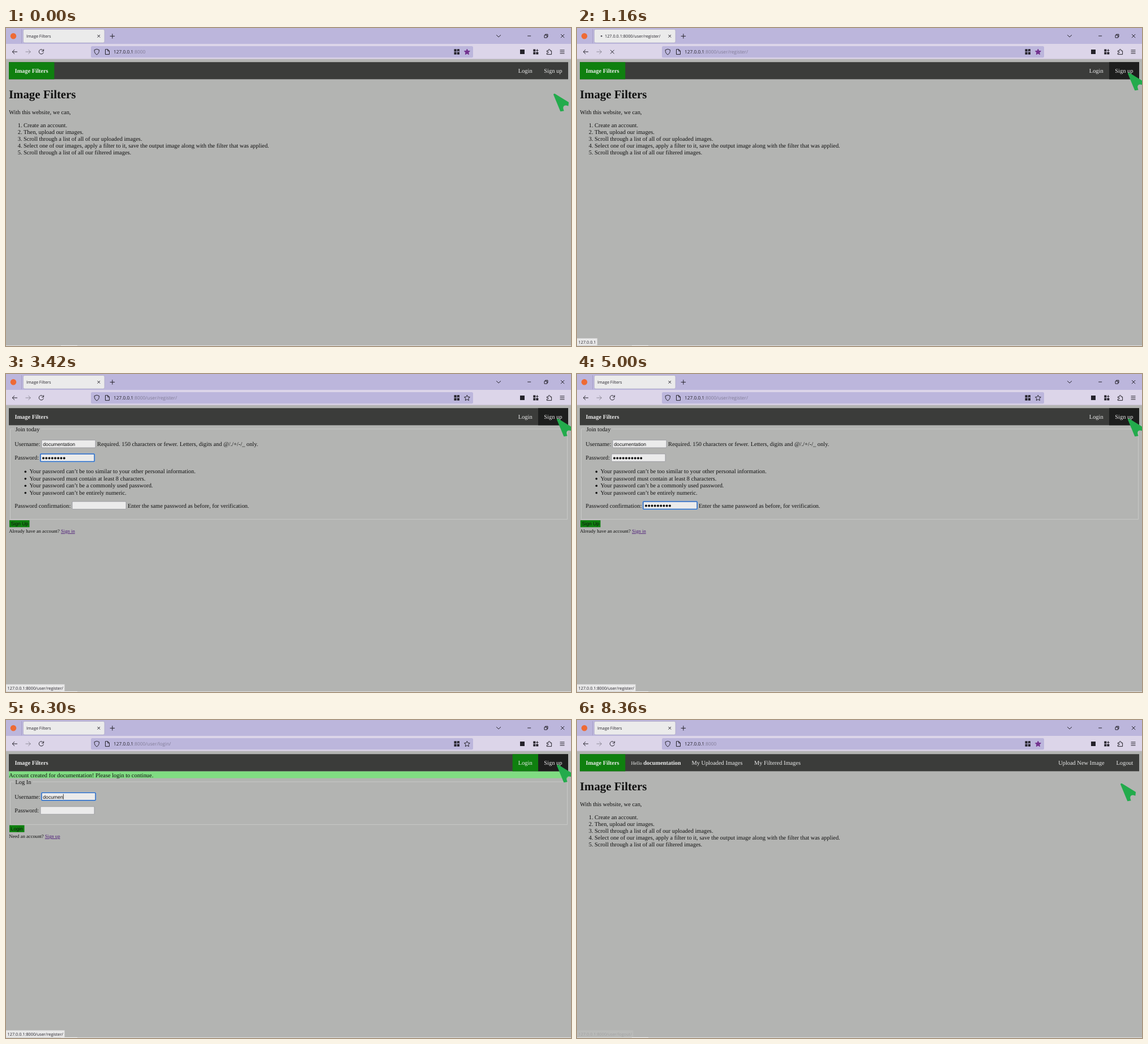
An HTML page for the animation above (8540 ms loop, 998 by 561 pixels).

```html
<!DOCTYPE html>
<html lang="en">
<head>
<meta charset="utf-8">
<title>Image Filters</title>
<style>
html, body { margin: 0; height: 100%; overflow: hidden; background: #b3b4b2; }
svg { display: block; width: 100vw; height: 100vh; }
text { font: 10.4px "Liberation Serif", serif; fill: #101010; white-space: pre; text-rendering: geometricPrecision; }
.ui { font: 7.3px "Open Sans", sans-serif; fill: #25232b; }
.url { font-size: 8.3px; }
.small { font-size: 8.67px; }
.sans { font: 8.67px "Liberation Sans", sans-serif; }
.bold { font-weight: bold; }
.h1 { font-size: 20.8px; font-weight: bold; }
.nav { fill: #ececec; }
.link { fill: #4c1a78; text-decoration: underline; }
.icon { fill: none; stroke: #25232b; stroke-width: 1; stroke-linejoin: round; }
.solid { fill: #25232b; stroke: none; }
.green { fill: #0f800f; }
.groove { fill: none; stroke: #c8c9c7; stroke-width: 1; }
.box { fill: #ebebeb; stroke: #8b8b93; stroke-width: .7; }
.focus { fill: none; stroke: #1762c9; stroke-width: 1.4; }
.halo { fill: none; stroke: #8fb0dc; stroke-width: .7; }
.dots { stroke: #101010; stroke-width: 4; stroke-linecap: round; stroke-dasharray: 0 5.25; }
.caret { stroke: #101010; stroke-width: .8; }
</style>
</head>
<body>
<svg id="stage" viewBox="0 0 998 561" preserveAspectRatio="none"></svg>
<script>
const USER = "documentation";
const HOST = "127.0.0.1";
const LOOP = 8540;

const text = (x, y, content, cls = "", id = "") =>
  `<text x="${x}" y="${y}" class="${cls}" id="${id}">${content}</text>`;
const rect = (x, y, w, h, attrs = "") =>
  `<rect x="${x}" y="${y}" width="${w}" height="${h}" ${attrs}/>`;
const icon = (d, attrs = "") => `<path class="icon" d="${d}" ${attrs}/>`;
const group = (id, ...parts) => `<g id="${id}">${parts.join("")}</g>`;

// Runs are [first key, interval, number of keys]; all times in ms.
const fields = [
  { id: "newName", x: 63, y: 116.6, from: 1240, to: 2760, runs: [[1540, 110, 5], [2040, 75, 5], [2480, 80, 3]] },
  { id: "newPass", x: 61, y: 141, from: 2760, to: 3800, secret: true, runs: [[2900, 66, 7], [3340, 160, 3]] },
  { id: "confirm", x: 117, y: 225, from: 3800, to: 5600, secret: true, runs: [[4040, 114, 8], [4960, 160, 2]] },
  { id: "name", x: 63, y: 128.4, from: 5600, to: 6900, runs: [[5820, 80, 11], [6740, 70, 2]] },
  { id: "pass", x: 61, y: 152.8, from: 6900, to: 7920, secret: true, runs: [[7000, 64, 6], [7460, 60, 4]] },
];

const loads = [
  { start: 1040, commit: 1120, paint: 1240, end: 1320, path: "/user/register/" },
  { start: 5260, commit: 5400, paint: 5600, end: 5700, path: "/user/login/" },
  { start: 7760, commit: 7820, paint: 7920, end: 7940, path: "" },
];

function fieldMarkup({ id, x, y, secret }) {
  const content = secret
    ? `<line class="dots" id="${id}Value" x1="${x + 5}" x2="${x + 5}" y1="${y + 7.5}" y2="${y + 7.5}"/>`
    : text(x + 2.3, y + 10.2, "", "sans", id + "Value") +
      `<line class="caret" id="${id}Caret" y1="${y + 2.2}" y2="${y + 11.6}"/>`;
  return rect(x, y, 95, 13.4, 'class="box" rx="1"') +
    group(id + "Focus",
      rect(x - .2, y, 95.4, 13.4, 'class="focus" rx="1"'),
      rect(x - 1.2, y - 1, 97.4, 15.4, 'class="halo" rx="2"')) + content;
}
const field = id => fieldMarkup(fields.find(f => f.id === id));
const fieldset = (top, bottom, gapEnd) =>
  `<path class="groove" d="M14 ${top}H7.5V${bottom}H991.5V${top}H${gapEnd}"/>`;

const tabBar = [
  rect(0, 0, 998, 28, 'fill="#bcb6dc"'),
  '<circle cx="13" cy="14.3" r="5.2" fill="#ee6a35"/>',
  rect(27, 2, .8, 25, 'fill="#a39dc4"'),
  rect(30.5, 2.5, 143.5, 23.5, 'rx="2.5" fill="#ebebeb" stroke="#a9a4c0" stroke-width=".6"'),
  '<circle id="throbber" cy="14.3" r="1.3" fill="#44424c"/>',
  text(36, 17.4, "", "ui", "tabTitle"),
  icon("M161.5 12l4.6 4.6m0-4.6l-4.6 4.6", 'stroke-width=".8"'),
  icon("M183.7 14.4h8.4m-4.2-4.2v8.4"),
  icon("M866.2 12.3l3.9 3.6 3.9-3.6"),
  icon("M921.2 14h6"),
  icon("M951 12.7h4.6v4.4h-4.6zM952.4 12.5v-1.4h4.6v4.5h-1.3", 'stroke-width=".8"'),
  icon("M980 11l6.2 6.2m0-6.2l-6.2 6.2", 'stroke-width=".9"'),
];

const star = "M814.4 37.2l1.5 3.2 3.5.4-2.6 2.4.7 3.5-3.1-1.8-3.1 1.8.7-3.5-2.6-2.4 3.5-.4z";
const toolbar = [
  rect(0, 28, 998, 27, 'fill="#dcd5e9"'),
  rect(0, 54.4, 998, .7, 'fill="#c3bccb"'),
  icon("M20 42H11.2m3.9-3.8L11.2 42l3.9 3.8"),
  icon("M34.5 42h8.8m-3.9-3.8l3.9 3.8-3.9 3.8", 'opacity=".4"'),
  icon("M65.6 39.4a4.1 4.1 0 1 0 .7 3.5M66.5 37.4v3.4h-3.4", 'id="reload"'),
  icon("M59 38.8l6.6 6.6m0-6.6l-6.6 6.6", 'id="stop"'),
  rect(150, 32, 675, 20.3, 'rx="2.5" fill="#bcb6dc"'),
  icon("M160.3 37.3l4.2 1.4q.3 5.8-4.2 8.4q-4.5-2.6-4.2-8.4z"),
  icon("M175.5 37.7h4.4l2.6 2.7v6.2h-7zM179.7 37.7v2.9h2.8", 'stroke-width=".9"'),
  `<text x="190" y="45.3" class="ui url">${HOST}<tspan id="path" fill="#827d98"></tspan></text>`,
  '<path class="solid" d="M791.5 37.3h4.2v4.2h-4.2zM791.5 42.6h4.2v4.2h-4.2zM796.8 42.6h4.2v4.2h-4.2zM796.8 37.3h4.2v4.2h-1.4v-1.8l-1.8 1.8h-1z"/>',
  icon(star, 'id="star"'),
  rect(908, 38, 8, 8, 'class="solid"'),
  '<path class="solid" d="M931.3 37.5h4v4h-4zM931.3 42.5h4v4h-4zM936.3 42.5h4v4h-4zM937.8 37.3h1.1v1.7h1.7v1.1h-1.7v1.7h-1.1v-1.7h-1.7V39h1.7z"/>',
  icon("M955.3 40.2h2.7v-1q0-1.7 1.5-1.7t1.5 1.7v1h2.6v6.4h-8.3v-2.3h1.2q1.5 0 1.5-1.2t-1.5-1.2h-1.2z", 'stroke-width=".9"'),
  icon("M978.5 39h8m-8 2.9h8m-8 2.9h8"),
];

const navigation = [
  rect(5, 60.2, 988, 30.2, 'fill="#3b3c3a"'),
  rect(5, 60.2, 80.3, 30.2, 'class="green" id="homeActive"'),
  rect(894.7, 60.2, 45.3, 30.2, 'class="green" id="loginActive"'),
  rect(940, 60.2, 53, 30.2, 'fill="#1d1e1d" id="hover"'),
  text(15.4, 79.2, "Image Filters", "nav bold"),
  group("guestLinks", text(904.8, 79.2, "Login", "nav"), text(950.3, 79.2, "Sign up", "nav")),
  group("memberLinks",
    text(95.5, 79.2, "Hello", "nav small"), text(117.2, 79.2, USER, "nav bold"),
    text(202.4, 79.2, "My Uploaded Images", "nav"), text(313, 79.2, "My Filtered Images", "nav"),
    text(850.2, 79.2, "Upload New Image", "nav"), text(952.4, 79.2, "Logout", "nav")),
];

const steps = [
  "Create an account.",
  "Then, upload our images.",
  "Scroll through a list of all of our uploaded images.",
  "Select one of our images, apply a filter to it, save the output image along with the filter that was applied.",
  "Scroll through a list of all our filtered images.",
];
const rules = [
  "be too similar to your other personal information.",
  "must contain at least 8 characters.",
  "be a commonly used password.",
  "be entirely numeric.",
].map(rule => "Your password " + (rule.startsWith("must") ? rule : "can’t " + rule));

const home = group("home",
  text(5, 123.9, "Image Filters", "h1"),
  text(5.2, 152.3, "With this website, we can,"),
  ...steps.map((step, i) => text(20.7, 174.6 + 12 * i, i + 1 + ".") + text(31, 174.6 + 12 * i, step)));

const register = group("register",
  fieldset(97, 256.3, 62), text(16.4, 100.6, "Join today"),
  text(15.3, 127, "Username:"), field("newName"),
  text(161, 127, "Required. 150 characters or fewer. Letters, digits and @/./+/-/_ only."),
  text(15.3, 151.4, "Password:"), field("newPass"),
  ...rules.map((rule, i) => {
    const y = 175.4 + 12.45 * i;
    return `<circle cx="34.3" cy="${y - 3}" r="1.8" fill="#101010"/>` + text(41.4, y, rule);
  }),
  text(15.3, 235.5, "Password confirmation:"), field("confirm"),
  text(215, 235.5, "Enter the same password as before, for verification."),
  rect(6, 258, 35.5, 12.3, 'class="green"'), text(8.6, 267.2, "Sign Up", "sans"),
  text(5.2, 280.2, "Already have an account?", "small"), text(97, 280.2, "Sign in", "small link"));

const login = group("login",
  rect(5, 90.4, 988, 12.2, 'fill="#80dc82"'),
  text(5.2, 100.6, `Account created for ${USER}! Please login to continue.`),
  fieldset(109, 184.4, 47), text(16.4, 112.5, "Log In"),
  text(15.3, 138.8, "Username:"), field("name"),
  text(15.3, 163.3, "Password:"), field("pass"),
  rect(6, 185.6, 26.5, 12.3, 'class="green"'), text(8.6, 194.9, "Login", "sans"),
  text(5.2, 208, "Need an account?", "small"), text(68.8, 208, "Sign up", "small link"));

const overlay = [
  rect(0, 559.9, 998, 1.1, 'fill="#dededd"'), rect(97, 559.9, 29, 1.1, 'fill="#f4f4f4"'),
  group("status",
    rect(-1, 547.4, 0, 12.6, 'id="statusBox" fill="#e8e8e8" stroke="#c9c9c9" stroke-width=".6"'),
    text(2.6, 557, "", "ui", "statusText")),
  '<path id="cursor" fill="#23ab4c" d="M0 1.5Q.5-1 3 .3L27 15L26.3 21.8Q18.5 18.5 17.2 24.2Q17 27 18.6 30.2L12.3 31.3Z"/>',
];

const stage = document.getElementById("stage");
stage.innerHTML = [rect(0, 0, 998, 561, 'fill="#b3b4b2"'), ...tabBar, ...toolbar,
  home, register, login, ...navigation, ...overlay].join("");

const el = id => document.getElementById(id);
const show = (id, visible) => { el(id).style.display = visible ? "" : "none"; };
const set = (id, attrs) => { for (const key in attrs) el(id).setAttribute(key, attrs[key]); };
const write = (id, content) => { if (el(id).textContent !== content) el(id).textContent = content; };
const clamp = (v, min, max) => Math.min(max, Math.max(min, v));
const ease = (t, from, to) => {
  const u = clamp((t - from) / (to - from), 0, 1);
  return u * u * (3 - 2 * u);
};
const typed = (t, runs) => runs.reduce(
  (sum, [start, gap, count]) => sum + clamp(Math.floor((t - start) / gap) + 1, 0, count), 0);

function drawField(t, { id, x, from, to, secret, runs }) {
  const count = typed(t, runs), focused = t >= from && t < to;
  show(id + "Focus", focused);
  if (secret) {
    show(id + "Value", count > 0);
    set(id + "Value", { x2: x + 5.1 + 5.25 * (count - 1) });
    return;
  }
  write(id + "Value", USER.slice(0, count));
  show(id + "Caret", focused && count > 0);
  if (!focused) return;
  const end = x + 2.7 + el(id + "Value").getComputedTextLength();
  set(id + "Caret", { x1: end, x2: end });
}

function drawBrowser(t, load, path) {
  const committed = load && t >= load.commit;
  show("throbber", load);
  if (load) set("throbber", { cx: 41 - 3.5 * Math.cos((t - load.start) * .0186) });
  set("tabTitle", { x: load ? 49 : 36 });
  write("tabTitle", committed && t < load.paint ? HOST + ":8000" + (path || "/") : "Image Filters");
  write("path", ":8000" + path);
  show("reload", !committed);
  show("stop", committed);
  set("reload", { transform: load ? "translate(.9 .2)" : "" });
  const starred = t < 1240 || t >= 7940;
  el("star").style.fill = starred ? "#73328f" : "none";
  el("star").style.stroke = starred ? "#73328f" : "#25232b";
}

function drawPointer(t, load, member) {
  const arrive = ease(t, 600, 820), leave = ease(t, 8120, 8360);
  const x = 967 + 6 * arrive - 13 * leave, y = 116 - 37 * arrive + 33 * leave;
  const hovering = y < 90;
  set("cursor", { transform: `translate(${x} ${y})` });
  show("hover", hovering);
  set("hover", { x: member ? 942 : 940, width: member ? 51 : 53 });

  const waiting = load && t >= load.commit && t < load.paint;
  write("statusText", waiting ? HOST : `${HOST}:8000/user/${member ? "logout" : "register"}/`);
  set("statusBox", { width: el("statusText").getComputedTextLength() + 6 });
  const fading = member ? clamp((8380 - t) / 160, .1, 1) : 0;
  set("status", { opacity: hovering ? 1 : fading });
}

function draw(t) {
  const load = loads.find(l => t >= l.start && t < l.end);
  const path = loads.reduce((current, l) => t >= l.commit ? l.path : current, "");
  const painted = loads.filter(l => t >= l.paint).length;
  const page = ["home", "register", "login", "home"][painted], member = painted === 3;
  for (const name of ["home", "register", "login"]) show(name, name === page);
  show("homeActive", page === "home");
  show("loginActive", page === "login");
  show("guestLinks", !member);
  show("memberLinks", member);
  fields.forEach(f => drawField(t, f));
  drawBrowser(t, load, path);
  drawPointer(t, load, member);
}

const began = performance.now();
function tick() {
  draw((performance.now() - began) % LOOP);
  requestAnimationFrame(tick);
}
tick();
</script>
</body>
</html>
```
